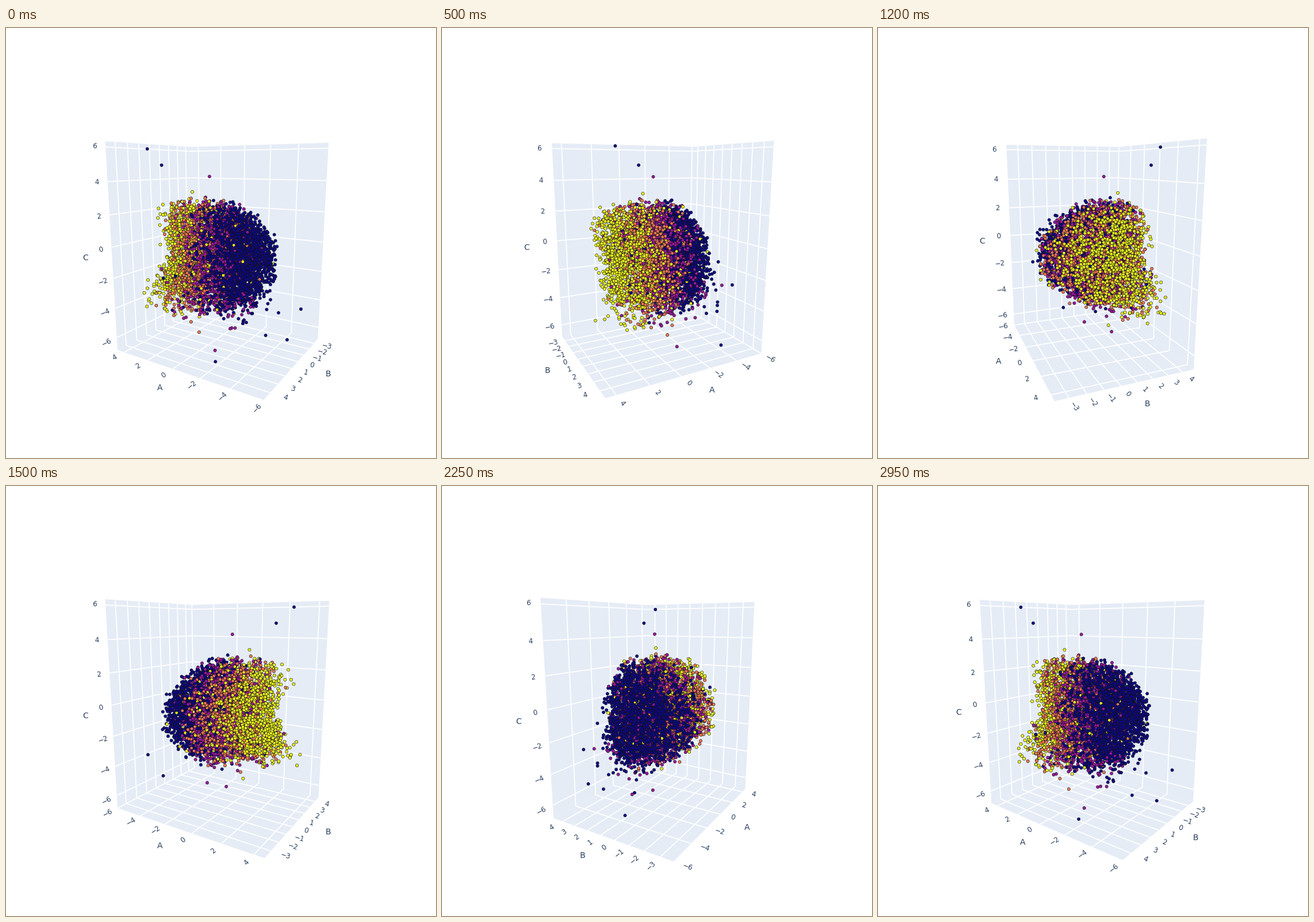
Recreate the animation shown at these times as a matplotlib script. Size 748 by 748 pixels, loop 3000 ms.

```python
import numpy as np
import matplotlib.pyplot as plt
from matplotlib.animation import FuncAnimation
from matplotlib.collections import LineCollection, PolyCollection

SIZE, DPI, FRAMES = 748, 100, 60
PX = 72 / DPI
INK, WALL = "#2a3f5f", "#e5ecf6"
PALETTE = np.array([plt.matplotlib.colors.to_rgb(c)
                    for c in ("#0d0887", "#9c179e", "#ed7953", "#f0f921")])

# Box: data units to model units
SCALE = 0.0956
MID = np.array([-0.70, 0.50, -0.272])
HALF = np.array([0.508, 0.409, 0.631])
TICKS = [range(-6, 5, 2), range(-3, 5), range(-6, 7, 2)]

# Camera
EYE_R, EYE_Z = np.hypot(1.25, 2), 0.5
START = np.arctan2(2, -1.25)
FOCAL = 568 / 2 / np.tan(np.pi / 8)
CX, CY = SIZE / 2, 384

rng = np.random.default_rng(11)


def grade(score):
    """Turn a score into one of the four colour classes."""
    return np.clip(np.rint(score), 0, 3).astype(int)


def body(n):
    """Soft ball, bent into two lobes on the high-A side."""
    u = rng.normal(size=(n, 3))
    u /= np.linalg.norm(u, axis=1, keepdims=True)
    u *= (rng.random(n) ** 0.38 * (1 + 0.07 * rng.normal(size=n)))[:, None]
    ua, ub, uc = u.T
    front, back = np.clip(ua, 0, None), np.clip(-ua, 0, None)
    a = -0.7 + 3.4 * ua + 2.2 * front * abs(uc) + 0.9 * back * uc
    b = 0.3 + 3.4 * ub + 1.1 * uc ** 2 + 3.2 * front * np.clip(-uc, 0, None)
    c = -0.6 + 3.4 * uc * (1 + 0.25 * front)
    score = 1.1 + 3.3 * ua + 0.6 * rng.standard_t(3, n)
    return np.stack([a, b, c], axis=1), grade(score)


def tail(n):
    """Sparse points hanging below the body."""
    a = rng.normal(-2.0, 1.4, n)
    b = rng.normal(1.3, 1.0, n)
    c = -3.0 - 0.9 * abs(rng.normal(size=n)) - 0.15 * a
    return np.stack([a, b, c], axis=1), grade(1 + 0.5 * (a + 1.3) + 0.6 * rng.normal(size=n))


LONE_NAVY = [(3.02, 2.96, 5.92), (1.79, 3.13, 4.96), (-2.9, 4.6, -5.67),
             (-5.6, -1.15, -3.9), (-5.15, -0.15, -5.69)]
LONE_PURPLE = [(-0.18, 1.0, 4.28), (-1.28, 2.14, -6.46)]

parts = [body(5200), tail(150), (LONE_NAVY, [0] * 5), (LONE_PURPLE, [1] * 2)]
POINTS = (np.vstack([p for p, _ in parts]) - MID) * SCALE
COLORS = PALETTE[np.concatenate([k for _, k in parts])]


def camera(phi):
    eye = np.array([EYE_R * np.cos(phi), EYE_R * np.sin(phi), EYE_Z])
    fwd = -eye / np.linalg.norm(eye)
    right = np.array([-np.sin(phi), np.cos(phi), 0])
    return eye, right, np.cross(right, fwd), fwd


def project(p, cam):
    eye, right, up, fwd = cam
    q = np.asarray(p, float) - eye
    depth = q @ fwd
    xy = np.stack([CX + FOCAL * (q @ right) / depth,
                   CY - FOCAL * (q @ up) / depth], axis=-1)
    return xy, depth


def tick_pos(axis, value):
    return (value - MID[axis]) * SCALE


def face(axis, side):
    """Corners and grid lines of one side of the box."""
    i, j = [k for k in range(3) if k != axis]
    corners = np.zeros((4, 3))
    corners[:, axis] = side * HALF[axis]
    corners[:, i] = HALF[i] * np.array([-1, 1, 1, -1])
    corners[:, j] = HALF[j] * np.array([-1, -1, 1, 1])
    lines = []
    for k, other in ((i, j), (j, i)):
        for v in TICKS[k]:
            line = np.zeros((2, 3))
            line[:, axis] = side * HALF[axis]
            line[:, k] = tick_pos(k, v)
            line[:, other] = -HALF[other], HALF[other]
            lines.append(line)
    return corners, lines


fig = plt.figure(figsize=(SIZE / DPI, SIZE / DPI), dpi=DPI, facecolor="white")
ax = fig.add_axes([0, 0, 1, 1])
ax.set_xlim(0, SIZE)
ax.set_ylim(SIZE, 0)
ax.axis("off")

walls = ax.add_collection(PolyCollection([], facecolors=WALL, edgecolors="none", zorder=1))
grid = ax.add_collection(LineCollection([], colors="white", linewidths=1.8 * PX, zorder=2))
dots = ax.scatter(POINTS[:, 0], POINTS[:, 1], s=(5.3 * PX) ** 2, marker=(12, 0, 0),
                  edgecolors="#111111", linewidths=0.6 * PX, zorder=3)


def label(text, px):
    return ax.text(0, 0, text, fontsize=px * PX, color=INK, family="DejaVu Sans",
                   ha="center", va="center", zorder=4)


tick_labels = [[label(str(v).replace("-", "\u2212"), 12) for v in t] for t in TICKS]
titles = [label(name, 14) for name in "ABC"]


def place_axis(axis, base, out, cam):
    """Put tick labels and title outside the box edge running through base."""
    for text, v in zip(tick_labels[axis], TICKS[axis]):
        p = base.copy()
        p[axis] = tick_pos(axis, v)
        (edge, spot), _ = project([p, p + 0.079 * out], cam)
        dx, dy = spot - edge
        angle = np.degrees(np.arctan2(-dy, dx))
        text.set_position(spot)
        text.set_rotation((angle + 90) % 180 - 90)
    spot, _ = project(base + 0.191 * out, cam)
    titles[axis].set_position(spot)


def draw(k):
    cam = camera(START - 2 * np.pi * k / FRAMES)
    sa, sb = np.sign(cam[0][:2])

    polys, lines = [], []
    for axis, side in ((0, -sa), (1, -sb), (2, -1)):
        corners, rules = face(axis, side)
        polys.append(project(corners, cam)[0])
        lines += [project(r, cam)[0] for r in rules]
    walls.set_verts(polys)
    grid.set_segments(lines)

    xy, depth = project(POINTS, cam)
    order = np.argsort(-depth)
    dots.set_offsets(xy[order])
    dots.set_facecolors(COLORS[order])

    a, b, c = HALF
    out_a, out_b = np.array([sa, 0, 0]), np.array([0, sb, 0])
    place_axis(0, np.array([0, sb * b, -c]), out_b, cam)
    place_axis(1, np.array([sa * a, 0, -c]), out_a, cam)
    # The C labels follow the left outline of the box
    ends = [(np.array([-sa * a, sb * b, 0]), out_b), (np.array([sa * a, -sb * b, 0]), out_a)]
    base, out = min(ends, key=lambda e: e[0] @ cam[1])
    place_axis(2, base, out, cam)
    return []


anim = FuncAnimation(fig, draw, frames=FRAMES, interval=50, init_func=lambda: [],
                     repeat=True, repeat_delay=0, blit=False)
plt.show()
```
